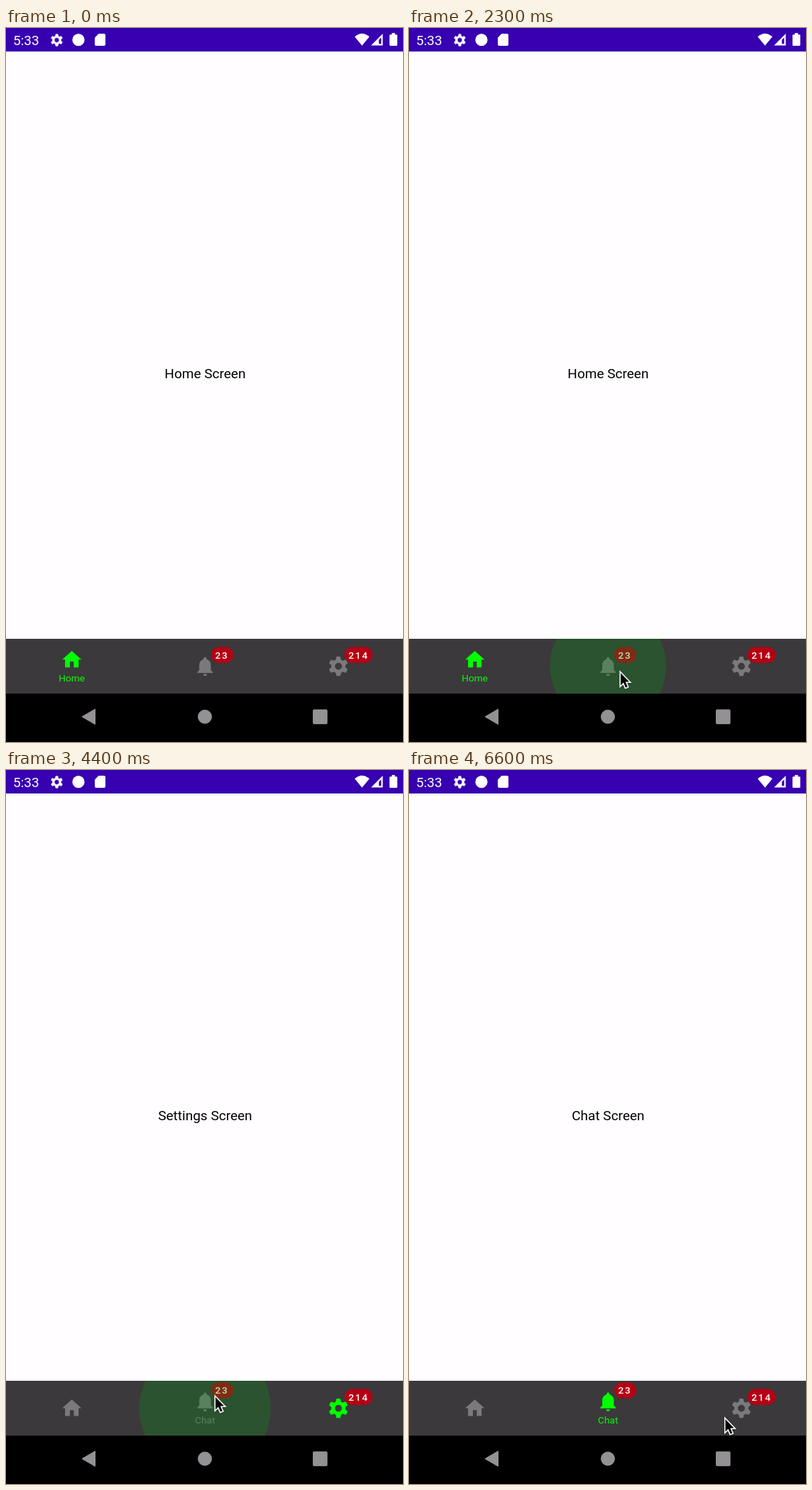
Animation, 559 px wide and 1003 px high, one loop 6.7 s. Source, as an HTML page:

```html
<!DOCTYPE html>
<html lang="en">
<head>
<meta charset="utf-8">
<title>Bottom navigation with badges</title>
<style>
  html, body { margin: 0; width: 100%; height: 100%; overflow: hidden; background: #fffdff; }
  svg { display: block; width: 100vw; height: 100vh; }
  text { font-family: Roboto, "Noto Sans", sans-serif; }
  .screen { font-size: 19.04px; text-anchor: middle; fill: #000; }
  .label { font-size: 13.6px; text-anchor: middle; letter-spacing: .1px; }
  .count { font-size: 13.6px; font-weight: 500; letter-spacing: 1.7px; fill: #fff; }
</style>
</head>
<body>
<svg viewBox="0 0 559 1003" xmlns="http://www.w3.org/2000/svg">
  <defs>
    <clipPath id="barClip"><rect y="858" width="559" height="77"/></clipPath>
    <filter id="shadow" x="-50%" y="-50%" width="200%" height="200%">
      <feDropShadow dx="0" dy="1" stdDeviation="1" flood-opacity=".35"/>
    </filter>
    <path id="home" d="M10 20v-6h4v6h5v-8h3L12 3 2 12h3v8z" transform="translate(-12 -12)"/>
    <path id="bell" transform="translate(-12 -12)" d="M12 22c1.1 0 2-.9 2-2h-4c0 1.1.9 2 2 2zm6-6v-5c0-3.07-1.64-5.64-4.5-6.32V4c0-.83-.67-1.5-1.5-1.5s-1.5.67-1.5 1.5v.68C7.63 5.36 6 7.92 6 11v5l-2 2v1h16v-1l-2-2z"/>
    <path id="gear" fill-rule="evenodd" stroke="currentColor" stroke-width=".8" stroke-linejoin="round"/>
  </defs>

  <rect width="559" height="1003" fill="#fffdff"/>

  <!-- status bar -->
  <rect width="559" height="33" fill="#3700b1"/>
  <g fill="#fff" color="#fff">
    <text x="10" y="24" font-size="19.04">5:33</text>
    <use href="#gear" transform="translate(71.5 17) scale(.86)"/>
    <circle cx="102" cy="16.7" r="8.6"/>
    <path d="M130.5 8H138a2 2 0 0 1 2 2v13a2 2 0 0 1-2 2h-11a2 2 0 0 1-2-2v-9.5z"/>
    <path d="M491 12.3Q501.3 3 511.6 12.3L501.3 24.7z"/>
    <path fill-rule="evenodd" d="M530.5 8v16.5H514zM528.3 13.3l-3.3 3.5v5.5h3.3z"/>
    <path d="M543.3 7h4.4v2.2h2a1.3 1.3 0 0 1 1.3 1.3v13.2a1.3 1.3 0 0 1-1.3 1.3h-8.4a1.3 1.3 0 0 1-1.3-1.3V10.5a1.3 1.3 0 0 1 1.3-1.3h2z"/>
  </g>

  <g id="screens"></g>

  <!-- tab bar -->
  <rect y="858" width="559" height="77" fill="#3b393b"/>
  <g id="tabs"></g>
  <g clip-path="url(#barClip)"><circle id="ripple" cy="896.5" fill="#009614"/></g>

  <!-- system buttons -->
  <rect y="935" width="559" height="68" fill="#000"/>
  <g fill="#949194" stroke="#949194" stroke-linejoin="round">
    <path d="M107 967.5l18.5-10.7v21.4z"/>
    <circle cx="280" cy="967.5" r="9.5"/>
    <rect x="432.5" y="957.8" width="19.6" height="19.6" rx="1"/>
  </g>

  <g id="cursor" filter="url(#shadow)">
    <path d="M0 0V17.4L4 13.6 7 20.6 9.8 19.4 6.8 12.6H12.1z" fill="#000" stroke="#fff" stroke-width="3" paint-order="stroke"/>
  </g>
</svg>
<script>
const LOOP = 6700, TICK = 100;
const GREY = [123, 121, 123], GREEN = [0, 255, 0];
const $ = id => document.getElementById(id);

function add(parent, tag, attrs, text) {
  const el = document.createElementNS('http://www.w3.org/2000/svg', tag);
  for (const k in attrs) el.setAttribute(k, attrs[k]);
  if (text) el.textContent = text;
  parent.append(el);
  return el;
}

const clamp = v => Math.max(0, Math.min(1, v));
const mix = (a, b, k) => a + (b - a) * k;
const tint = k => `rgb(${GREY.map((c, i) => Math.round(mix(c, GREEN[i], k)))})`;

// cubic-bezier(.4, 0, .2, 1), solved by bisection
function ease(x) {
  if (x <= 0 || x >= 1) return clamp(x);
  let lo = 0, hi = 1, s = .5;
  for (let i = 0; i < 24; i++) {
    s = (lo + hi) / 2;
    const bx = 1.2 * s * (1 - s) ** 2 + .6 * s * s * (1 - s) + s ** 3;
    if (bx < x) lo = s; else hi = s;
  }
  return s * s * (3 - 2 * s);
}

// six-tooth gear with a round hole
const rim = [];
for (let k = 0; k < 6; k++) {
  const c = Math.cos(k * Math.PI / 3), s = Math.sin(k * Math.PI / 3);
  for (const [x, y] of [[-2.4, -6.5], [-1.7, -9.6], [1.7, -9.6], [2.4, -6.5]])
    rim.push((x * c - y * s).toFixed(2) + ' ' + (x * s + y * c).toFixed(2));
}
$('gear').setAttribute('d', 'M' + rim.join('L') + 'zM-4 0a4 4 0 1 0 8 0a4 4 0 1 0-8 0z');

const tabs = [
  { name: 'Home', icon: 'home', x: 92.7 },
  { name: 'Chat', icon: 'bell', x: 280.3, count: '23', width: 31 },
  { name: 'Settings', icon: 'gear', x: 468, count: '214', width: 39.5 }
];
for (const tab of tabs) {
  tab.screen = add($('screens'), 'text', { class: 'screen', x: 280.4, y: 491.7 }, tab.name + ' Screen');
  tab.root = add($('tabs'), 'g', {});
  tab.label = add(tab.root, 'text', { class: 'label', x: tab.x, y: 918 }, tab.name);
  tab.top = add(tab.root, 'g', {});
  add(tab.top, 'use', { href: '#' + tab.icon, transform: `translate(${tab.x} 896.6) scale(1.36)` });
  if (tab.count) {
    add(tab.top, 'rect', { x: tab.x + 8.7, y: 869.5, width: tab.width, height: 22.4, rx: 11.2, fill: '#b50014' });
    add(tab.top, 'text', { class: 'count', x: tab.x + 14.3, y: 885.6 }, tab.count);
  }
}

const taps = [
  { tab: 1, press: 2214, select: 2325, fade: 2440 },
  { tab: 2, press: 3410, select: 3520, fade: 3650 },
  { tab: 1, press: 4281, select: 4395, fade: 4506 },
  { tab: 0, press: 4905, select: 4920, fade: 5080 },
  { tab: 1, press: 5760, select: 5870, fade: 5990 }
];

// pointer stops: time, x, y
const path = [
  [400, 542, 840], [500, 520, 830], [600, 513, 826], [700, 513, 826], [800, 462, 706],
  [900, 383, 581], [1000, 352, 655], [1200, 304, 926], [1400, 302, 910], [1700, 302, 910],
  [2100, 298, 906], [2900, 298, 906], [3300, 459, 896], [3700, 459, 896], [4100, 295, 881],
  [4500, 295, 881], [4900, 137, 888], [5200, 137, 888], [5600, 298, 900], [5900, 298, 900],
  [6300, 445.5, 912], [6700, 445.5, 912]
];

function drawCursor(t) {
  const i = path.findIndex(p => p[0] > t);
  $('cursor').style.display = i > 0 ? '' : 'none';
  if (i < 1) return;
  const a = path[i - 1], b = path[i], k = (t - a[0]) / (b[0] - a[0]);
  $('cursor').setAttribute('transform', `translate(${mix(a[1], b[1], k)} ${mix(a[2], b[2], k)})`);
}

function drawTabs(t) {
  let now = 0, before = 0, k = 1;
  for (const tap of taps) {
    if (t < tap.select) break;
    before = now;
    now = tap.tab;
    k = ease((t - tap.select) / 300);
  }
  tabs.forEach((tab, i) => {
    const on = i === now, level = on ? k : i === before ? 1 - k : 0;
    tab.screen.setAttribute('opacity', level);
    tab.root.setAttribute('fill', tint(level));
    tab.root.setAttribute('color', tint(level));
    tab.label.style.display = on ? '' : 'none';
    tab.top.setAttribute('transform', `translate(0 ${on ? -9.3 : 0})`);
  });
}

function drawRipple(t) {
  const tap = taps.find(p => t >= p.press && t < p.fade + 150);
  $('ripple').style.display = tap ? '' : 'none';
  if (!tap) return;
  const age = t - tap.press;
  const alpha = clamp(age / 75) * (1 - clamp((t - tap.fade) / 150));
  $('ripple').setAttribute('cx', tabs[tap.tab].x);
  $('ripple').setAttribute('r', mix(56, 101, ease(age / 225)));
  $('ripple').setAttribute('opacity', .28 * alpha);
}

function draw(t) {
  drawCursor(t);
  drawTabs(t);
  drawRipple(t);
}

function loop() {
  const tick = Math.floor(performance.now() / TICK + .15) * TICK;
  draw(tick % LOOP);
  requestAnimationFrame(loop);
}
loop();
</script>
</body>
</html>
```
